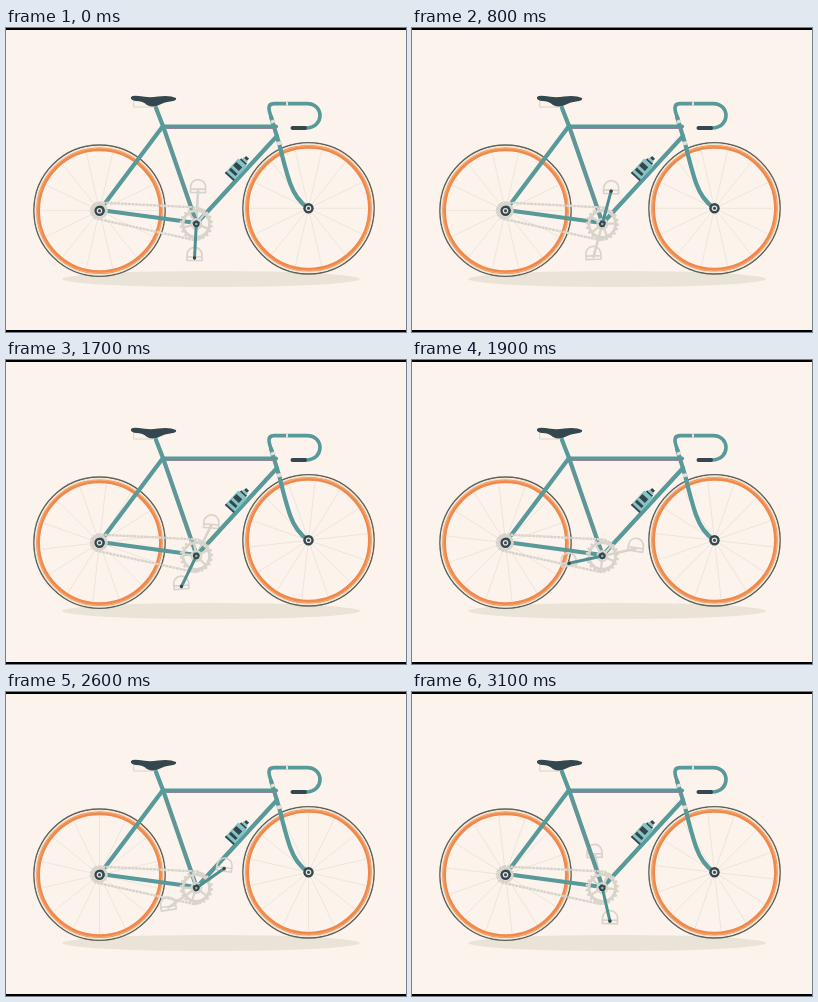
An HTML page for the animation above (3.2 s loop, 400 by 304 pixels).

```html
<!DOCTYPE html>
<html lang="en">
<head>
<meta charset="utf-8">
<title>Bicycle</title>
<style>
  html, body { margin: 0; width: 100%; height: 100%; overflow: hidden; background: #fcf4ec; }
  svg { display: block; width: 100%; height: 100%; }
  .line { fill: none; stroke-linecap: round; stroke-linejoin: round; }
  .tube { stroke: #58999a; stroke-width: 4.2; }
  .grey { stroke: #d8d4cc; }
  .dark { fill: #34464e; }
</style>
</head>
<body>
<svg viewBox="0 0 400 304">
  <defs>
    <g id="rim" fill="none">
      <circle r="65.6" stroke="#5d625c" stroke-width="1.5"/>
      <circle r="64" stroke="#f3e5d2" stroke-width="1.6"/>
      <circle r="61.4" stroke="#ef894c" stroke-width="3.8"/>
      <circle r="62.7" stroke="#f8b17f" stroke-width=".8"/>
    </g>
    <g id="hub">
      <circle r="5.2" class="dark"/>
      <circle r="2.8" fill="#e4e2da"/>
      <circle r="1.5" class="dark"/>
    </g>
    <path id="pedal" class="line grey" stroke-width="1.7"
      d="M-7.5 2.5V-3A7.5 7.5 0 0 1 7.5 -3V2.5ZM-7 -1H7"/>
  </defs>

  <rect width="400" height="304" fill="#fcf4ec"/>
  <ellipse cx="205" cy="251" rx="149" ry="8" fill="#e9e3d8"/>

  <g transform="translate(93.5 182.7)"><g class="spokes"></g><use href="#rim"/></g>
  <g transform="translate(302.5 180.3)"><g class="spokes"></g><use href="#rim"/></g>

  <g id="backCrank">
    <path class="line grey" stroke-width="2.6" d="M0 0H34"/>
  </g>
  <use id="backPedal" href="#pedal"/>

  <!-- saddle -->
  <path class="line grey" stroke-width="1" d="M128 72L127.500 79H148"/>
  <path class="dark" d="M125 69Q127 67 133 68Q143 70 152 68.500Q164 67 170 70Q171 72 167 73Q158 74 153 77Q147 80 141 77Q137 73 130 73Q124 72 125 69Z"/>

  <!-- frame -->
  <g class="line tube">
    <path d="M150 80L157 98L190.500 195"/>
    <path d="M157 98L94 182"/>
    <path d="M94 182L190.500 195"/>
    <path d="M271 108L191 195"/>
    <path d="M157 98.500H270"/>
    <path d="M265 89L273 115Q279 140 284 155Q290 172 302 180"/>
    <path stroke-width="3.600" d="M266 91Q263 84 263 80Q263 75.600 268 75.600H301C318 75.600 319 99.500 300 100H292"/>
  </g>
  <path d="M159 100.500H269" stroke="#8b8798" stroke-width="1"/>
  <path d="M159 104L189 191" stroke="#7f8995" stroke-width=".8"/>
  <path d="M286.500 100H299" class="line" stroke="#34464e" stroke-width="4"/>
  <path d="M266.500 92L267.500 95M272.500 113.500L273.500 117M280 75.600H282" stroke="#e2dfd7" stroke-width="4.400"/>

  <!-- bottle -->
  <g transform="translate(230 141.700) rotate(-47)">
    <rect x="-10" y="-6" width="20" height="12" rx="1" fill="#83c5c4"/>
    <path class="dark" d="M-10 -6h2v12h-2zM-5 -5h3v9h-3zM1 -5h5v8h-5zM10 -4h2v8h-2z"/>
    <rect x="12" y="-3" width="2" height="6" fill="#83c5c4"/>
    <rect x="14" y="-2" width="3" height="4" class="dark"/>
  </g>

  <!-- drivetrain -->
  <g class="line grey">
    <path id="chain" stroke-width="2.400" stroke-linecap="butt" stroke-dasharray="3 .6"
      d="M93 174.500L191 179.500A16.500 16.500 0 0 1 188 212L92 191A8.300 8.300 0 0 1 93 174.500Z"/>
    <circle cx="93.500" cy="182.700" r="7" stroke-width="2.600"/>
  </g>
  <g id="ring" class="line grey">
    <circle r="13.400" stroke-width="3"/>
    <circle r="15.500" stroke-width="2.400" stroke-linecap="butt" stroke-dasharray="2.400 2.470"/>
    <circle r="5" stroke-width="2"/>
    <path id="arms" stroke-width="2.300"/>
  </g>
  <use href="#hub" x="93.500" y="182.700"/>
  <use href="#hub" x="302.500" y="180.300"/>

  <use id="frontPedal" href="#pedal"/>
  <g id="frontCrank">
    <path class="line" stroke="#4f8f92" stroke-width="3" d="M0 0H34"/>
    <circle r="3.300" class="dark"/>
    <circle r="1.300" fill="#9aa9aa"/>
    <circle cx="34" r="1.700" class="dark"/>
  </g>

  <path d="M0 0H400V2H0ZM0 302H400V304H0Z" fill="#000"/>
</svg>
<script>
  const LOOP = 3200, TURN = 1600, STEP = 100;
  const AXLE = { x: 190.3, y: 196 }, CRANK = 34;
  // [ms, degrees] through one turn of the crank
  const poses = [[0, 93], [100, 116], [600, 245], [800, 285], [1200, 365], [1500, 437], [1600, 453]];
  const el = id => document.getElementById(id);
  const set = (node, value) => node.setAttribute('transform', value);
  const wheels = [...document.querySelectorAll('.spokes')];

  function rays(count, inner, outer) {
    let d = '';
    for (let i = 0; i < count; i++) {
      const a = i / count * 2 * Math.PI, c = Math.cos(a), s = Math.sin(a);
      d += `M${c * inner} ${s * inner}L${c * outer} ${s * outer}`;
    }
    return d;
  }
  wheels.forEach(w => {
    w.innerHTML = `<path d="${rays(14, 5, 59)}" stroke="#eae2d8" stroke-width=".8"/>`;
  });
  el('arms').setAttribute('d', rays(5, 4, 13));

  function crankAngle(time) {
    const t = time % TURN;
    const i = poses.findIndex(p => p[0] > t);
    const [t0, a0] = poses[i - 1], [t1, a1] = poses[i];
    return a0 + (a1 - a0) * (t - t0) / (t1 - t0);
  }

  function placeArm(side, angle) {
    const r = angle * Math.PI / 180;
    const x = AXLE.x + CRANK * Math.cos(r), y = AXLE.y + CRANK * Math.sin(r);
    set(el(side + 'Crank'), `translate(${AXLE.x} ${AXLE.y}) rotate(${angle})`);
    set(el(side + 'Pedal'), `translate(${x} ${y}) rotate(${10 * Math.cos(r)})`);
  }

  const start = performance.now();
  function draw(now) {
    const t = Math.floor(Math.max(0, now - start) % LOOP / STEP) * STEP;
    const angle = crankAngle(t);
    placeArm('front', angle);
    placeArm('back', angle + 180);
    set(el('ring'), `translate(${AXLE.x} ${AXLE.y}) rotate(${angle})`);
    el('chain').setAttribute('stroke-dashoffset', -t / LOOP * 57.6);
    wheels.forEach(w => set(w, `rotate(${t / LOOP * 1440})`));
    requestAnimationFrame(draw);
  }
  draw(start);
</script>
</body>
</html>
```
